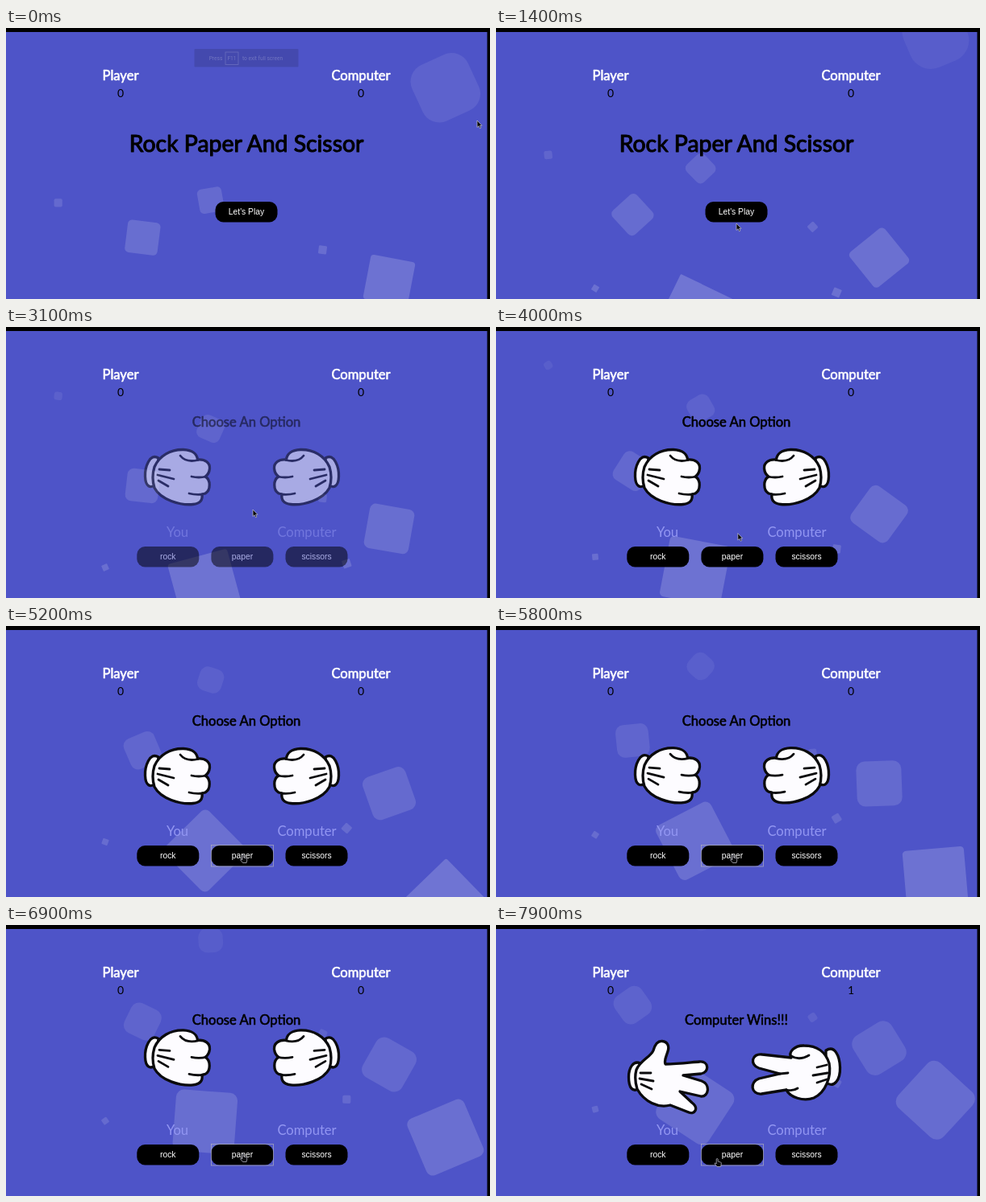
Recreate the animation shown at these times as an HTML page. Size 600x337 px, loop 8 s.

```html
<!DOCTYPE html>
<html lang="en">
<head>
<meta charset="utf-8">
<title>Rock Paper And Scissor</title>
<style>
  html, body { margin: 0; height: 100%; overflow: hidden; background: #000; }
  svg { display: block; width: 100vw; height: 100vh; }
  text { font: 16.6px Lato, "Open Sans", sans-serif; text-anchor: middle; }
  .bold { stroke: currentColor; stroke-width: .036em; stroke-linejoin: round; }
  .white { fill: #fff; color: #fff; }
  .title { font-size: 28.4px; }
  .score { font-size: 14px; }
  .label { fill: #9296f2; }
  .button text { font: 10.3px "Liberation Sans", Arial, sans-serif; fill: #fff; }
  .glove path { fill: #fdfcff; stroke: #0a0a0c; stroke-width: 3.3; stroke-linejoin: round; stroke-linecap: round; }
  .glove .line { fill: none; stroke-width: 2.8; }
  #notice text { font: 6.6px Roboto, sans-serif; fill: #fff; fill-opacity: .24; }
  #cursor path { fill: #0a0a0c; stroke: #c4c4d2; stroke-width: .7; stroke-linejoin: round; }
</style>
</head>
<body>
<svg viewBox="0 0 600 337">
  <defs>
    <g id="rock" class="glove">
      <path d="M189 163C178 156 172 175 172.500 186C173 199 179 201 186 196Z"/>
      <path d="M184 174C190 160 204 152 220 152.500C231 153 237 158 237.500 165C247 164 253 169 252.500 176C252 181 250 184 247 186C254 190 254 203 247 207L243 208C244 215 241 219.500 232 220.500C216 222 192 215 184 200Q180 187 184 174Z"/>
      <path class="line" d="M216 160Q223 169 238 165.500M230 186Q239 188 248 186M227 207Q235 209 244 208M190 177L203 178M188 184L208 189M189 191L201 198"/>
    </g>
    <g id="paper" class="glove">
      <path d="M179 172C170 168 164.500 178 164.500 189C164.500 202 169 209 178 203Z"/>
      <path d="M174 180C179 168 192 164 195 156C197 149 200 144 206 144.500C213 145 215 151 213 157C211 164 208 168 210 173C225 173 240 171 252 170C264 169 265 183 254 185L232 187L255 194C266 198 264 214 254 213L228 207L243 221C252 228 246 236 239 233L216 224C201 228 184 220 175 204Q171 191 174 180Z"/>
      <path class="line" d="M179 184L192 184M178 191L195 194M180 198L193 204"/>
    </g>
    <g id="scissors" class="glove">
      <path d="M409 156C420 149 426 163 426.500 177C427 193 419 203 409 196Z"/>
      <path d="M366 165C362 158 370 149.500 382 150C398 150 409 158 413 172C416 188 409 208 394 215C381 220 364 214 360 205L329 210C316 211 314 195 326 191L352 185L326 178C314 174 317 159 330 161Z"/>
      <path class="line" d="M366 163Q376 169 388 162M352 185L362 184M360 205Q368 207 374 203M398 177L410 174M393 187L411 184M398 196L410 192"/>
    </g>
  </defs>

  <rect width="600" height="337" fill="#4e54c8"/>
  <g id="squares" fill="#fff"></g>

  <text class="bold white" x="142" y="65">Player</text>
  <text class="bold white" x="440" y="65">Computer</text>
  <text class="score" x="142" y="86">0</text>
  <text class="score" x="440" y="86" id="score">0</text>

  <g id="intro">
    <text class="bold title" x="298" y="154">Rock Paper And Scissor</text>
    <g class="button">
      <rect x="259.500" y="216" width="77" height="25.500" rx="10"/>
      <text x="298" y="232.200">Let's Play</text>
    </g>
  </g>

  <g id="match">
    <text class="bold" x="298" y="124.300" id="verdict">Choose An Option</text>
    <g id="fists">
      <use href="#rock"/>
      <use href="#rock" transform="translate(585 0) scale(-1 1)"/>
    </g>
    <g id="result">
      <use href="#paper"/>
      <use href="#scissors"/>
    </g>
    <text class="label" x="212.500" y="261">You</text>
    <text class="label" x="373" y="261">Computer</text>
    <g class="button" id="options"></g>
    <rect id="focus" x="254.500" y="272.500" width="77" height="26.500" fill="none" stroke="#b0b0bc" stroke-width=".7"/>
  </g>

  <g id="notice">
    <rect x="233.500" y="26" width="129" height="22.500" rx="1" fill-opacity=".13"/>
    <rect x="272" y="30" width="16" height="15.500" fill="none" stroke="#fff" stroke-opacity=".2" stroke-width=".8"/>
    <text x="260" y="40">Press</text>
    <text x="280" y="40">F11</text>
    <text x="318" y="40">to exit full screen</text>
  </g>

  <g id="cursor">
    <path id="arrow" d="M0 0V8.500L2 6.800L3.500 9.800L4.900 9.100L3.500 6.300H6Z"/>
    <path id="hand" d="M-.8 0Q.3 -1.300 1.200 0V3L4.600 4Q5.600 4.500 5.300 6L4.600 9.500H0L-3 5.800Q-3 4.600 -1.800 5L-.8 6Z"/>
  </g>

  <path d="M0 0H600V337H596.500V5H0Z"/>
</svg>
<script>
const $ = id => document.getElementById(id);
const LOOP = 8000, STEP = 100, SCALE = .5093, AGE = 6.5;
const START = 2450, FOCUS = 5100, CLICK = 5290, END = CLICK + 2000;

// left edge (%), side, delay (s), duration (s)
const squares = [
  [25, 80, 0, 25], [10, 20, 2, 12], [70, 20, 4, 25], [40, 60, 0, 18], [65, 20, 0, 25],
  [75, 110, 3, 25], [35, 150, 7, 25], [20, 15, 2, 35], [85, 150, 0, 11]
].map(([left, side, delay, duration]) => {
  const size = side * SCALE;
  return { x: left * 5.96 + size / 2, y: 337 + 150 * SCALE - size / 2, size, delay, duration, el: add($("squares"), "rect") };
});

["rock", "paper", "scissors"].forEach((name, i) => {
  const x = 200.8 + i * 92.1;
  add($("options"), "rect", { x: x - 38.5, y: 273, width: 77, height: 25.5, rx: 10 });
  add($("options"), "text", { x, y: 289 }).textContent = name;
});

const path = [
  [200, 584, 115], [1000, 300, 240], [1400, 298, 243], [1900, 300, 236], [2200, 302, 229],
  [3100, 306, 227], [3500, 306, 228], [4500, 293.5, 285], [7300, 293.5, 285], [7800, 274, 291]
];
const shake = [[0, 0], [.15, 1], [.25, 0], [.35, 1], [.5, 0], [.65, 1], [.75, 0], [.85, 1], [1, 0]];

function add(parent, tag, attrs = {}) {
  const el = document.createElementNS("http://www.w3.org/2000/svg", tag);
  set(el, attrs);
  return parent.appendChild(el);
}

function set(el, attrs) {
  for (const key in attrs) el.setAttribute(key, attrs[key]);
}

const show = (id, on) => $(id).style.display = on ? "" : "none";
const clamp = v => Math.min(1, Math.max(0, v));

// the CSS "ease" curve
function ease(v) {
  const x = clamp(v);
  const curve = (u, a, b) => 3 * u * (1 - u) ** 2 * a + 3 * u * u * (1 - u) * b + u ** 3;
  let lo = 0, hi = 1;
  for (let i = 0; i < 20; i++) {
    const mid = (lo + hi) / 2;
    if (curve(mid, .25, .25) < x) lo = mid; else hi = mid;
  }
  return curve(lo, .1, 1);
}

// values at time t between keys of the form [time, ...values]
function along(keys, t, timing) {
  if (t <= keys[0][0]) return keys[0].slice(1);
  const i = keys.findIndex(key => key[0] > t);
  if (i < 0) return keys[keys.length - 1].slice(1);
  const a = keys[i - 1], b = keys[i];
  const k = timing((t - a[0]) / (b[0] - a[0]));
  return a.slice(1).map((v, j) => v + (b[j + 1] - v) * k);
}

function draw(t) {
  for (const { x, y, size, delay, duration, el } of squares) {
    const p = Math.max(0, AGE + t / 1000 - delay) / duration % 1;
    set(el, {
      x: -size / 2, y: -size / 2, width: size, height: size, rx: size * p / 2, opacity: .2 * (1 - p),
      transform: `translate(${x} ${y - 1000 * SCALE * p}) rotate(${720 * p})`
    });
  }

  set($("notice"), { opacity: clamp(1 - t / 400) });
  set($("intro"), { opacity: 1 - ease((t - START) / 500) });
  set($("match"), { opacity: ease((t - START - 500) / 500) });

  const lift = along(shake, (t - CLICK) / 2000, ease)[0] * 50 * SCALE;
  set($("fists"), { transform: `translate(0 ${-lift})` });

  const done = t >= END;
  show("fists", !done);
  show("result", done);
  show("focus", t >= FOCUS);
  $("score").textContent = done ? 1 : 0;
  $("verdict").textContent = done ? "Computer Wins!!!" : "Choose An Option";

  const pointing = t > 2000 && t < START || t > 4300;
  show("hand", pointing);
  show("arrow", !pointing);
  set($("cursor"), { transform: `translate(${along(path, t, k => k * k * (3 - 2 * k))})` });
}

function tick() {
  draw(Math.floor(performance.now() % LOOP / STEP) * STEP);
  requestAnimationFrame(tick);
}
tick();
</script>
</body>
</html>
```
